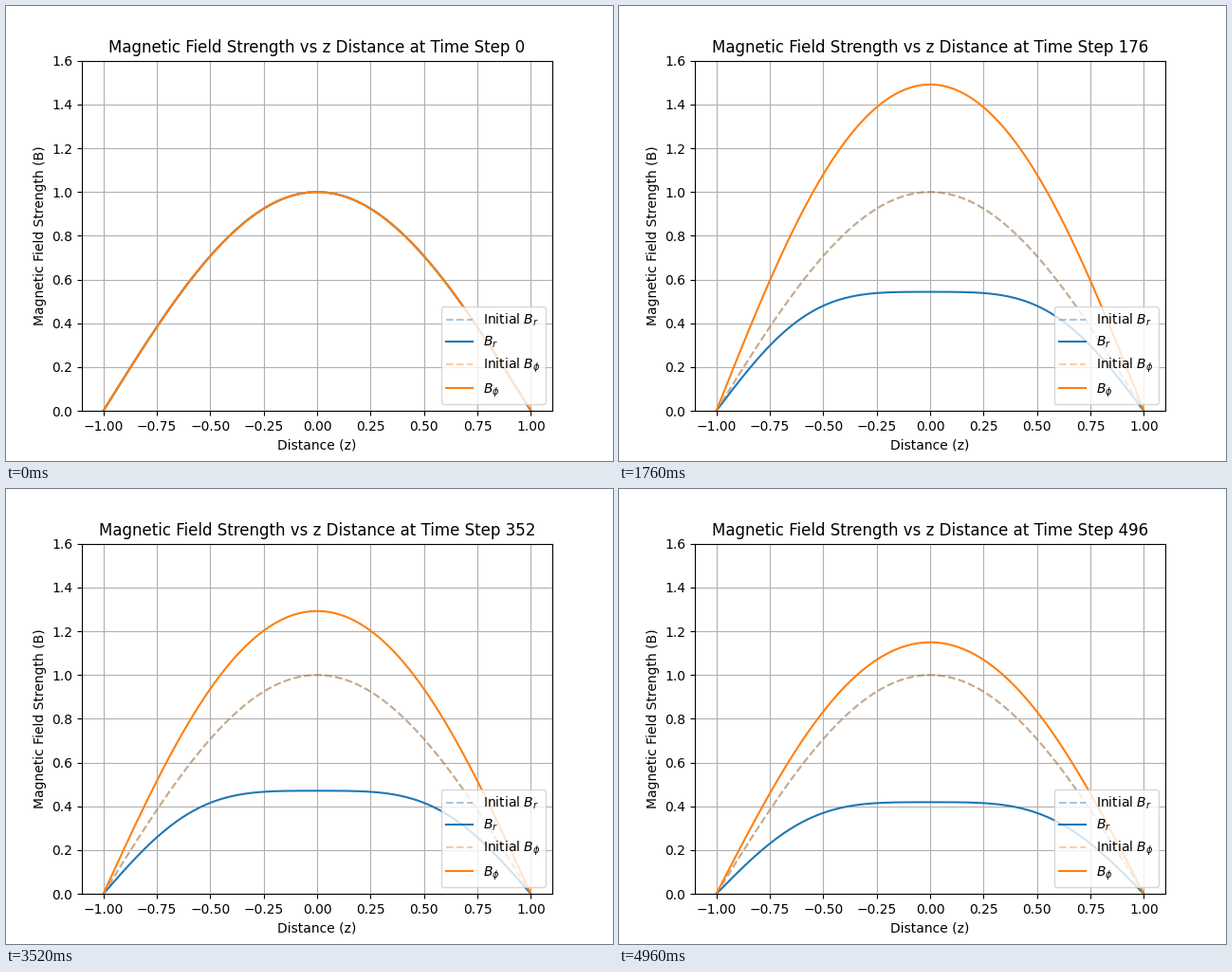
Animation of 640 by 480 pixels, one loop 5 s. Source, as a matplotlib script:

```python
import numpy as np
import matplotlib.pyplot as plt
from matplotlib.animation import FuncAnimation

FRAMES, INTERVAL, STEPS_PER_FRAME = 125, 40, 4

# Alpha-omega dynamo solved with modes cos(n pi z / 2), n odd
ETA = 0.01        # diffusion per step
SHEAR = 0.0589    # winds B_r up into B_phi
ALPHA = 0.010029  # turns B_phi back into B_r

orders = np.arange(1, 14, 2)
size = len(orders)
z = np.linspace(-1, 1, 201)
modes = np.cos(np.outer(z, orders) * np.pi / 2)


def build_operator():
    decay = np.diag(-ETA * (orders * np.pi / 2) ** 2)
    # -sin(pi z) dB/dz couples each mode to its neighbours
    twist = np.diag(orders[1:], 1) - np.diag(orders[:-1], -1)
    twist[0, 0] = 1
    return np.block([[decay, ALPHA * twist],
                     [SHEAR * np.eye(size), decay]])


rates, vectors = np.linalg.eig(build_operator())
start = np.zeros(2 * size)
start[[0, size]] = 1
weights = np.linalg.solve(vectors, start)


def fields(step):
    state = (vectors @ (weights * np.exp(rates * step))).real
    return modes @ state[:size], modes @ state[size:]


fig, ax = plt.subplots(figsize=(6.4, 4.8), dpi=100)
initial = np.cos(np.pi * z / 2)


def add_pair(color, name):
    ax.plot(z, initial, "--", color=color, alpha=0.4, label=f"Initial {name}")
    return ax.plot(z, initial, color=color, label=name)[0]


line_r = add_pair("C0", "$B_r$")
line_phi = add_pair("C1", r"$B_\phi$")
ax.set_xlim(-1.1, 1.1)
ax.set_ylim(0, 1.6)
ax.set_xlabel("Distance (z)")
ax.set_ylabel("Magnetic Field Strength (B)")
ax.grid(True)
ax.legend(loc="lower right")
title = ax.set_title("")


def update(frame):
    step = frame * STEPS_PER_FRAME
    b_r, b_phi = fields(step)
    line_r.set_ydata(b_r)
    line_phi.set_ydata(b_phi)
    title.set_text(f"Magnetic Field Strength vs z Distance at Time Step {step}")
    return line_r, line_phi, title


anim = FuncAnimation(fig, update, frames=FRAMES, interval=INTERVAL,
                     repeat=True, repeat_delay=0)
plt.show()
```
